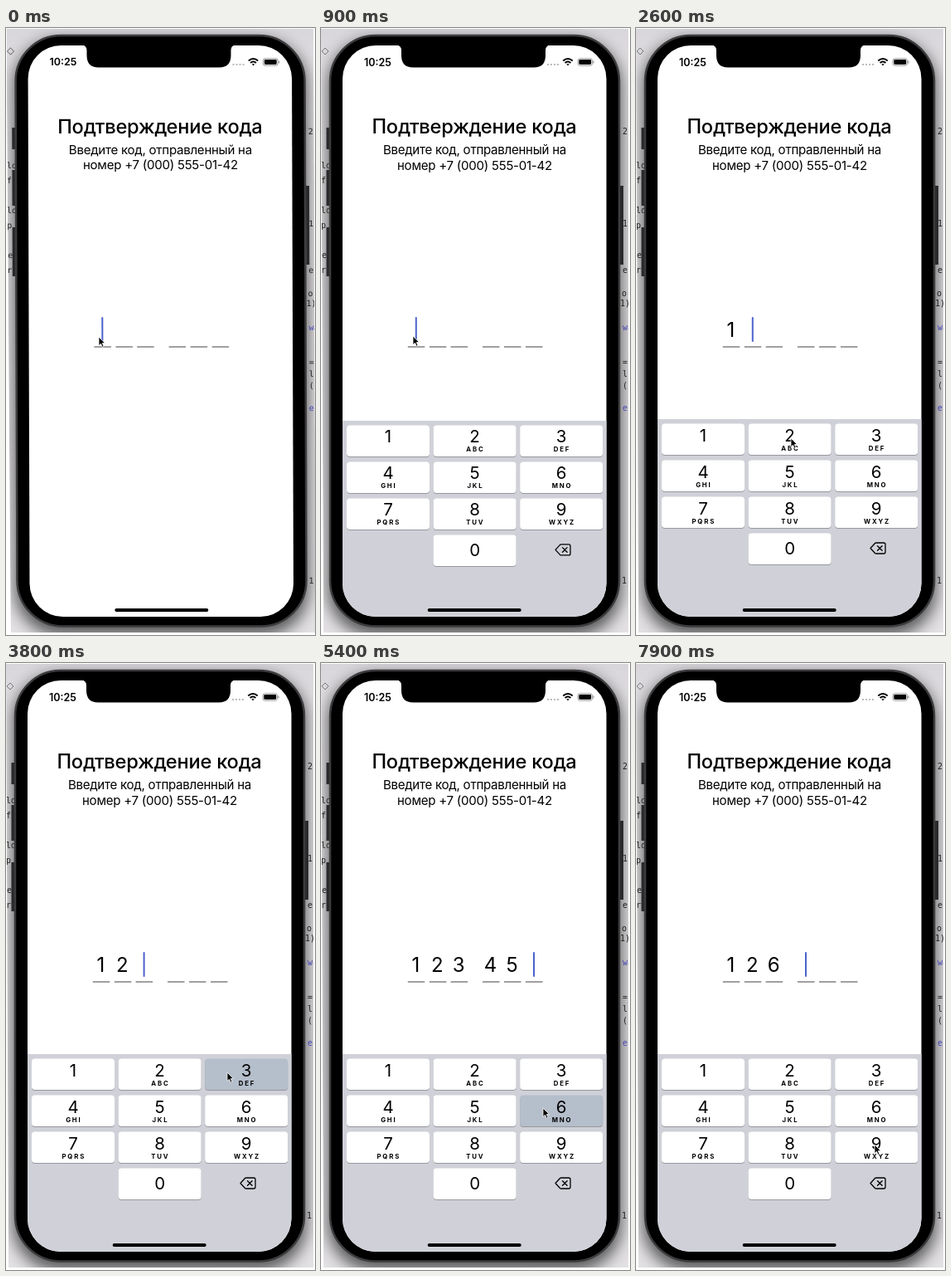
Recreate the animation shown at these times as an HTML page. Size 373 by 731 pixels, loop 8000 ms.

```html
<!DOCTYPE html>
<html lang="ru">
<head>
<meta charset="utf-8">
<title>Подтверждение кода</title>
<style>
html, body { margin: 0; width: 100%; height: 100%; overflow: hidden; background: #fff; }
svg { display: block; width: 373px; height: 731px; font-family: Inter, "Open Sans", sans-serif; }
.mid { text-anchor: middle; }
.mono { font: 10px "DejaVu Sans Mono", monospace; fill: #222; }
.letters { font-size: 7.8px; font-weight: 700; letter-spacing: 1.8px; }
</style>
</head>
<body>
<svg id="stage" viewBox="0 0 373 731">
  <defs>
    <linearGradient id="desk" x2="0" y2="1">
      <stop stop-color="#d8d6da"/><stop offset=".1" stop-color="#e2e0e3"/><stop offset="1" stop-color="#e2e0e3"/>
    </linearGradient>
    <filter id="blur" x="-20%" y="-10%" width="140%" height="120%"><feGaussianBlur stdDeviation="9"/></filter>
    <clipPath id="deskClip"><path d="M0 1H371V728H3Z"/></clipPath>
    <clipPath id="screenClip"><rect x="26" y="21" width="318.500" height="688" rx="40"/></clipPath>
  </defs>
  <g id="scene">
    <g clip-path="url(#deskClip)">
      <path d="M0 1H371V728H3Z" fill="url(#desk)"/>
      <rect x="8" y="14" width="355" height="718" rx="56" opacity=".6" filter="url(#blur)"/>
      <path d="M1 28l4-4 4 4-4 4z" fill="none" stroke="#777"/>
      <g id="deskText" class="mono"></g>
    </g>
    <path d="M8.500 120v26M8.500 171v43M8.500 240v59M363 190v95" stroke="#29292b" stroke-width="4"/>
    <rect x="11" y="9" width="349" height="711.500" rx="55" stroke="#3c3c3e" stroke-width="2.500"/>
    <rect x="26" y="21" width="318.500" height="688" rx="40" fill="#fff"/>
    <path d="M91 20.500Q97 21 97 27V33Q97 47.500 111 47.500H257Q271 47.500 271 33V27Q271 21 277 20.500Z"/>

    <text x="52" y="45.500" font-size="12.500" font-weight="600">10:25</text>
    <path d="M273 44h14" stroke="#bbb" stroke-width="2" stroke-dasharray="2 2"/>
    <g fill="none" stroke="#000" stroke-width="2">
      <path d="M292.300 39.500Q298 34.500 303.700 39.500M294.600 42Q298 39 301.400 42"/>
      <path d="M296.300 43.300h3.400L298 45.500z" fill="#000" stroke="none"/>
      <rect x="310" y="36.800" width="17.500" height="8.500" rx="2.500" stroke="#999" stroke-width="1"/>
      <rect x="311.300" y="38.100" width="14.900" height="5.900" rx="1.400" fill="#000" stroke="none"/>
      <path d="M329 39.500v3" stroke="#999" stroke-width="1.200"/>
    </g>

    <text class="mid" x="185" y="127.300" font-size="23.700" font-weight="500" letter-spacing="-.01em">Подтверждение кода</text>
    <g class="mid" font-size="15.100" letter-spacing="-.018em">
      <text x="185.500" y="152">Введите код, отправленный на</text>
      <text x="185.500" y="170.500">номер +7 (000) 555-01-42</text>
    </g>
    <g id="slots" class="mid" font-size="24"></g>
    <rect id="caret" y="348" width="2" height="30" rx="1" fill="#4c62cc"/>

    <g clip-path="url(#screenClip)">
      <g id="keyboard">
        <rect x="26" y="471" width="319" height="260" fill="#d0d1d8"/>
        <g id="keys" class="mid"></g>
        <g id="erase" stroke-width="1.300" stroke-linejoin="round" stroke-linecap="round">
          <path id="eraseBody" d="M283 626.500L288.500 620.500Q289 620 290 620H299Q301 620 301 622V631Q301 633 299 633H290Q289 633 288.500 632.500Z" stroke="#000"/>
          <path id="eraseCross" d="M291.500 623.700l5.600 5.600m0-5.600l-5.600 5.600"/>
        </g>
      </g>
      <rect x="128.700" y="699" width="113" height="4" rx="2"/>
    </g>
  </g>
  <path id="pointer" d="M0 0V10.500L2.500 8.300 4.200 12.200 6 11.400 4.300 7.600H7.500Z" stroke="#fff" stroke-width=".8"/>
</svg>
<script>
const LOOP = 8000, STEP = 100;
const $ = id => document.getElementById(id);
const clamp = v => Math.max(0, Math.min(1, v));

function add(parent, tag, attrs, text = '') {
  const node = document.createElementNS('http://www.w3.org/2000/svg', tag);
  for (const name in attrs) node.setAttribute(name, attrs[name]);
  node.textContent = text;
  return parent.appendChild(node);
}

// Code fragments visible on both sides of the phone.
const fragments = [
  [0, 169, 'ld'], [0, 187, 'fi'], [0, 223, 'ld'], [0, 241, 'p'], [1, 277, 'e'], [0, 295, 'r'],
  [364, 128, '2'], [364, 239, '1'], [364, 295, 'e'], [363, 323, 'o'], [361, 335, '1)'],
  [364, 364, 'wa', '#4547b5'], [364, 406, '='], [364, 420, 'l.'], [364, 434, '('],
  [364, 461, 'er', '#4547b5'], [363, 669, '1.']
];
for (const [x, y, text, fill = '#222'] of fragments) add($('deskText'), 'text', { x, y, style: `fill:${fill}` }, text);

const centers = [114.8, 140.8, 166.6, 205, 231, 257];
const digits = centers.map(x => {
  add($('slots'), 'path', { d: `M${x - 10} 384h20.500`, stroke: '#a0a0a0', 'stroke-width': 2 });
  return add($('slots'), 'text', { x: x - 0.5, y: 372 });
});

const groups = ['', 'ABC', 'DEF', 'GHI', 'JKL', 'MNO', 'PQRS', 'TUV', 'WXYZ'];
const keys = {};
function addKey(label, column, row, letters) {
  const x = 31 + 104.6 * column, y = 476.5 + 44 * row, size = { x, width: 100, height: 37.5, rx: 4 };
  add($('keys'), 'rect', { ...size, y: y + 1, fill: '#96989e' });
  keys[label] = add($('keys'), 'rect', { ...size, y });
  add($('keys'), 'text', { x: x + 50, y: y + (row === 3 ? 25.5 : 21), 'font-size': 20.5 }, label);
  add($('keys'), 'text', { x: x + 50.8, y: y + 32, class: 'letters' }, letters);
}
groups.forEach((letters, i) => addKey(String(i + 1), i % 3, Math.floor(i / 3), letters));
addKey('0', 1, 3, '');

// Press time, release time, key.
const presses = [
  [1800, 2000, '1'], [2700, 2900, '2'], [3700, 3900, '3'], [4400, 4600, '4'],
  [4900, 5000, '5'], [5400, 5500, '6'],
  [6000, 6100, 'erase'], [6400, 6500, 'erase'], [6700, 6800, 'erase'], [7000, 7100, 'erase'],
  [7500, 7700, '6']
];

// Pointer stops: time, x, y.
const stops = [
  [0, 112, 372], [300, 111, 371], [1100, 111, 371], [1700, 85, 492], [2000, 86, 492],
  [2500, 187, 494], [2900, 187, 494], [3600, 267, 493], [3900, 267, 493], [4400, 98, 537],
  [4600, 112, 537], [4700, 145, 535], [4900, 180, 535], [5000, 182, 535], [5400, 268, 536],
  [5500, 269, 536], [5900, 291, 628], [7100, 291, 628], [7400, 284, 535], [7700, 284, 535],
  [7900, 288, 580], [8000, 289, 590]
];

function pointerAt(t) {
  const next = stops.findIndex(stop => stop[0] > t);
  const [t0, x0, y0] = stops[next - 1], [t1, x1, y1] = stops[next];
  const p = (t - t0) / (t1 - t0), e = p * p * (3 - 2 * p);
  return [x0 + (x1 - x0) * e, y0 + (y1 - y0) * e];
}

function codeAt(t) {
  return presses.reduce((code, [down, up, key]) => {
    if (key === 'erase') return t >= down ? code.slice(0, -1) : code;
    return t >= up ? code + key : code;
  }, '');
}

function draw(t) {
  const code = codeAt(t);
  const active = presses.find(([down, up]) => t >= down && t < up)?.[2];
  const lean = 1 - clamp(t / 200);
  $('scene').setAttribute('transform', `translate(${0.4 * lean}) skewX(${0.18 * lean})`);

  digits.forEach((node, i) => node.textContent = code[i] || '');
  $('caret').setAttribute('x', (centers[code.length] ?? 0) - 1);
  $('caret').setAttribute('visibility', code.length < centers.length ? 'visible' : 'hidden');

  const hidden = (1 - clamp((t - 300) / 750)) ** 3;
  $('keyboard').setAttribute('transform', `translate(0 ${240 * hidden})`);
  for (const label in keys) keys[label].setAttribute('fill', label === active ? '#b5becb' : '#fff');
  const erasing = active === 'erase';
  $('eraseBody').setAttribute('fill', erasing ? '#000' : 'none');
  $('eraseCross').setAttribute('stroke', erasing ? '#fff' : '#000');

  $('pointer').setAttribute('transform', `translate(${pointerAt(t)})`);
}

const start = performance.now();
function tick() {
  const t = (performance.now() - start) % LOOP;
  draw(Math.floor(t / STEP) * STEP);
  requestAnimationFrame(tick);
}
tick();
</script>
</body>
</html>
```
